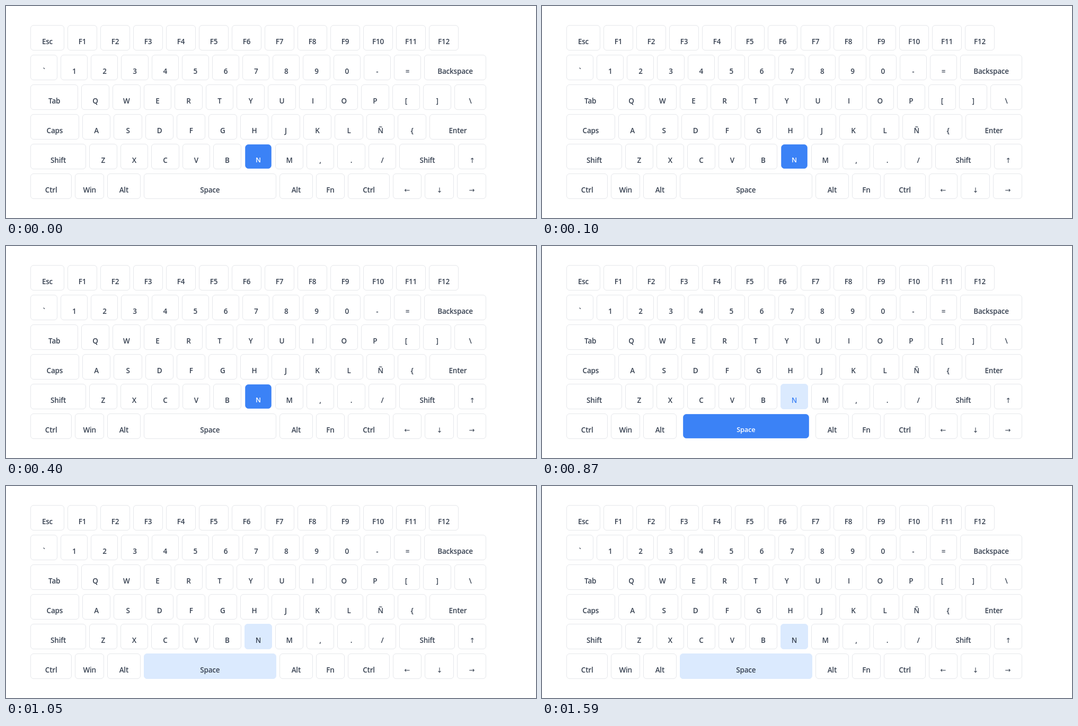
An HTML page for the animation above (1.95 s loop, 1000x400 px).

```html
<!DOCTYPE html>
<html lang="en">
<head>
<meta charset="utf-8">
<title>Keyboard</title>
<style>
  html, body { margin: 0; width: 100%; height: 100%; overflow: hidden; background: #fff; }
  svg { display: block; width: 1000px; height: 400px; }
  text {
    font: 600 13.5px "Open Sans", "Noto Sans", sans-serif;
    letter-spacing: -0.2px;
    text-anchor: middle;
  }
  .arrow { font: 400 13px "DejaVu Sans", sans-serif; letter-spacing: 0; }
</style>
</head>
<body>
<svg id="stage" viewBox="0 0 1000 400"></svg>
<script>
const LEFT = 46, TOP = 36, WIDTH = 860, GAP = 6, HEIGHT = 48, STEP = 56, UNIT = 56;
const PERIOD = 1950;

const rows = [
  "Esc F1 F2 F3 F4 F5 F6 F7 F8 F9 F10 F11 F12",
  "` 1 2 3 4 5 6 7 8 9 0 - = Backspace",
  "Tab Q W E R T Y U I O P [ ] \\",
  "Caps A S D F G H J K L Ñ { Enter",
  "Shift Z X C V B N M , . / Shift ↑",
  "Ctrl Win Alt Space Alt Fn Ctrl ← ↓ →"
];
const wide = {
  Esc: 64, Backspace: 128, Tab: 96, "\\": 64, Caps: 96, Enter: 112,
  Shift: 112, Ctrl: 80, Alt: 64, Space: 256
};
const looks = {
  idle: { fill: "#ffffff", line: "#e5e7eb", ink: "#374151", scale: 1 },
  down: { fill: "#3b82f6", line: "#3b82f6", ink: "#ffffff", scale: 0.95 },
  next: { fill: "#dbeafe", line: "#dbeafe", ink: "#3b82f6", scale: 1 },
  used: { fill: "#dbeafe", line: "#dbeafe", ink: "#374151", scale: 1 }
};

const stage = document.getElementById("stage");
const keys = {};

function add(parent, tag, attrs) {
  const el = document.createElementNS("http://www.w3.org/2000/svg", tag);
  for (const name in attrs) el.setAttribute(name, attrs[name]);
  return parent.appendChild(el);
}

function paint(key, state) {
  if (key.state === state) return;
  key.state = state;
  const { fill, line, ink, scale } = looks[state];
  key.box.setAttribute("fill", fill);
  key.box.setAttribute("stroke", line);
  key.label.setAttribute("fill", ink);
  key.group.setAttribute("transform",
    `translate(${key.cx} ${key.cy}) scale(${scale})`);
}

function addKey(name, x, w, y) {
  const x0 = Math.round(x), x1 = Math.round(x + w);
  const cx = x + w / 2, cy = y + HEIGHT / 2;
  const group = add(stage, "g", {});
  const box = add(group, "rect", {
    x: x0 - cx + 0.5, y: -HEIGHT / 2 + 0.5,
    width: x1 - x0 - 1, height: HEIGHT - 1, rx: 5.5
  });
  const label = add(group, "text", { x: 0, y: 12 });
  if ("←↑↓→".includes(name)) label.setAttribute("class", "arrow");
  label.textContent = name;
  keys[name] = { group, box, label, cx, cy };
  paint(keys[name], "idle");
}

// Rows wider than the board shrink in proportion to their key widths.
rows.forEach((row, i) => {
  const names = row.split(" ");
  const sizes = names.map(n => wide[n] || UNIT);
  const total = sizes.reduce((a, b) => a + b);
  const shrink = Math.min(1, (WIDTH - GAP * (names.length - 1)) / total);
  let x = LEFT;
  names.forEach((name, j) => {
    const w = sizes[j] * shrink;
    addKey(name, x, w, TOP + i * STEP);
    x += w + GAP;
  });
});

function draw(t) {
  paint(keys.N, t < 600 ? "down" : t < 1050 ? "next" : "used");
  paint(keys.Space, t < 600 ? "idle" : t < 1050 ? "down" : "used");
}

const start = performance.now();
function tick() {
  draw((performance.now() - start) % PERIOD);
  requestAnimationFrame(tick);
}
draw(0);
requestAnimationFrame(tick);
</script>
</body>
</html>
```
